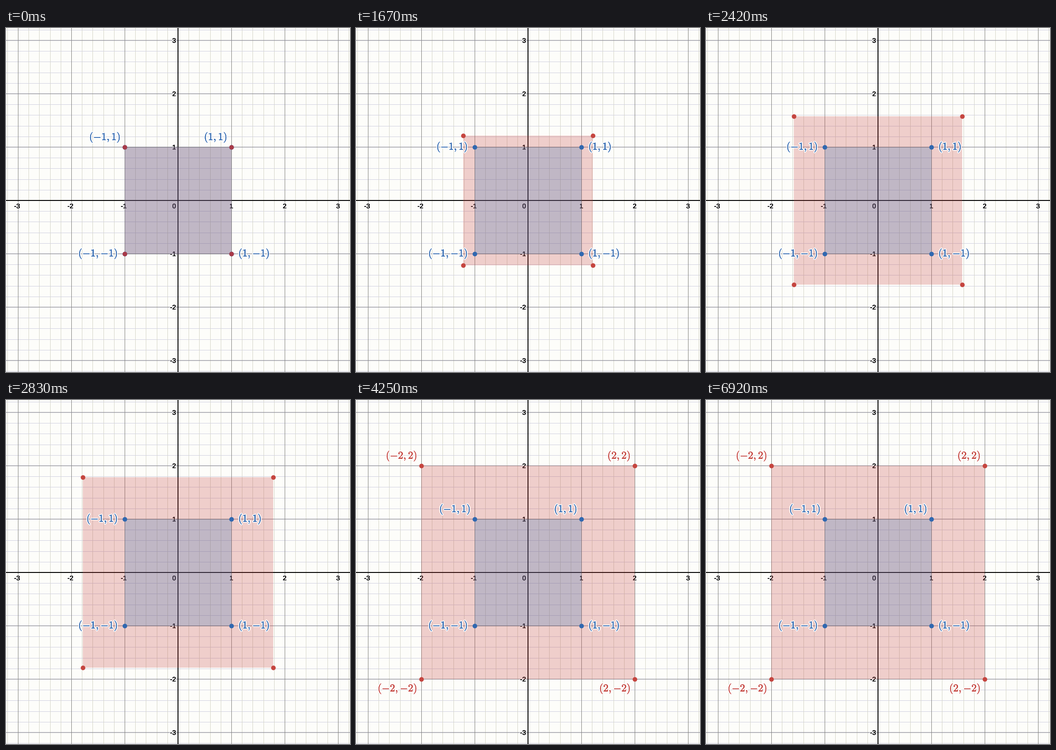
Animation of 748 by 748 pixels, one loop 7010 ms. Source, as a matplotlib script:

```python
import matplotlib.pyplot as plt
from matplotlib.animation import FuncAnimation
from matplotlib.patches import Rectangle
from matplotlib.patheffects import withStroke

SIZE, DPI = 748, 100
CX, CY, UNIT = 374, 375, 116
STEPS, LOOP = 84, 7010        # each step of the motion lasts two ticks
RED, BLUE, OVERLAP = "#c5453f", "#3068b0", "#a93a48"
SIDE_FROM, SIDE_TO = 19, 50   # labels sit beside the upper points
CORNERS = [(-1, 1), (1, 1), (-1, -1), (1, -1)]

plt.rcParams["mathtext.fontset"] = "cm"


def pt(px):
    return px * 72 / DPI


def sx(x):
    return CX + UNIT * x


def sy(y):
    return CY - UNIT * y


def outline(width, color):
    """White halo plus a hairline that gives the glyphs some weight."""
    return [withStroke(linewidth=pt(width), foreground="white"),
            withStroke(linewidth=pt(.4), foreground=color)]


fig = plt.figure(figsize=(SIZE / DPI, SIZE / DPI), dpi=DPI, facecolor="#fdfdfa")
ax = fig.add_axes([0, 0, 1, 1])
ax.axis("off")
ax.set_xlim(0, SIZE)
ax.set_ylim(SIZE, 0)

# Grid
for k in range(-16, 17):
    if k % 5:
        ax.axvline(sx(k / 5), color="#d5d5c8", lw=pt(1), zorder=1)
        ax.axhline(sy(k / 5), color="#d0d0e0", lw=pt(1), zorder=1)
for k in range(-3, 4):
    if k:
        ax.axvline(sx(k), color="#80807c", lw=pt(1), zorder=2)
        ax.axhline(sy(k), color="#8c8c98", lw=pt(1.3), zorder=2, snap=False)
ax.axvline(CX, color="black", lw=pt(2), zorder=3)
ax.axhline(CY, color="black", lw=pt(2), zorder=3)


def tick(x, y, value, ha):
    ax.text(x, y + 5, str(value), ha=ha, va="baseline", family="Liberation Sans",
            size=pt(14.3), color="black", path_effects=outline(3, "black"), zorder=4)


for k in range(-3, 4):
    if k:
        tick(sx(k) - (2 if k < 0 else 0), 387, k, "center")
        tick(369.5, sy(k), k, "right")
tick(369.5, 387, 0, "right")


def square(color, alpha, z):
    patch = Rectangle((sx(-1), sy(1)), 2 * UNIT, 2 * UNIT, lw=0,
                      fc=color, alpha=alpha, zorder=z)
    return ax.add_patch(patch)


big = square("#c74440", .25, 5)
square("#2d70b3", .24, 6)
ax.add_patch(Rectangle((sx(-1), sy(1)), 2 * UNIT, 2 * UNIT, fill=False,
                       ec="#6a6a70", alpha=.5, lw=pt(1), zorder=6))


def dots(color, z):
    line, = ax.plot([], [], "o", ms=pt(10), mfc=color, mew=0, zorder=z)
    return line


def label(x, y, color):
    def term(v):
        return ("{-}" if v < 0 else "") + str(abs(v))
    return ax.text(0, 0, f"$({term(x)},{term(y)})$", size=pt(22.8), color=color,
                   va="baseline", path_effects=outline(4, color), zorder=9)


def place(text, x, y, where):
    dx, dy, ha = {"up": (-9, -21, "right"), "down": (-9, 21, "right"),
                  "left": (-15, 0, "right"), "right": (15, 0, "left")}[where]
    text.set_position((sx(x) + dx, sy(y) + dy + 5.6))
    text.set_ha(ha)


blue = dots(BLUE, 7)
blue.set_data([sx(x) for x, _ in CORNERS], [sy(y) for _, y in CORNERS])
red = dots(RED, 8)

inner = [label(x, y, BLUE) for x, y in CORNERS]
outer = [label(2 * x, 2 * y, RED) for x, y in CORNERS]
for text, (x, y) in zip(outer, CORNERS):
    place(text, 2 * x, 2 * y, "up" if y > 0 else "down")


def scale(step):
    d = step - 16
    if d < -1:
        return 1.0
    return min(2.0, 1.06 + .039 * d + .000064 * d * d)


def draw(i):
    step = min((i + 1) // 2, STEPS - 1)
    s = scale(step)
    red.set_data([sx(s * x) for x, _ in CORNERS], [sy(s * y) for _, y in CORNERS])
    red.set_markerfacecolor(OVERLAP if s == 1 else RED)
    big.set_bounds(sx(-s), sy(s), 2 * s * UNIT, 2 * s * UNIT)

    beside = SIDE_FROM <= step < SIDE_TO
    for text, (x, y) in zip(inner, CORNERS):
        side = "left" if x < 0 else "right"
        place(text, x, y, side if y < 0 or beside else "up")
    for text in outer:
        text.set_visible(step >= SIDE_TO)
    return [red, big, *inner, *outer]


anim = FuncAnimation(fig, draw, frames=2 * STEPS, interval=LOOP / (2 * STEPS),
                     init_func=lambda: draw(0), repeat=True, repeat_delay=0)
plt.show()
```
